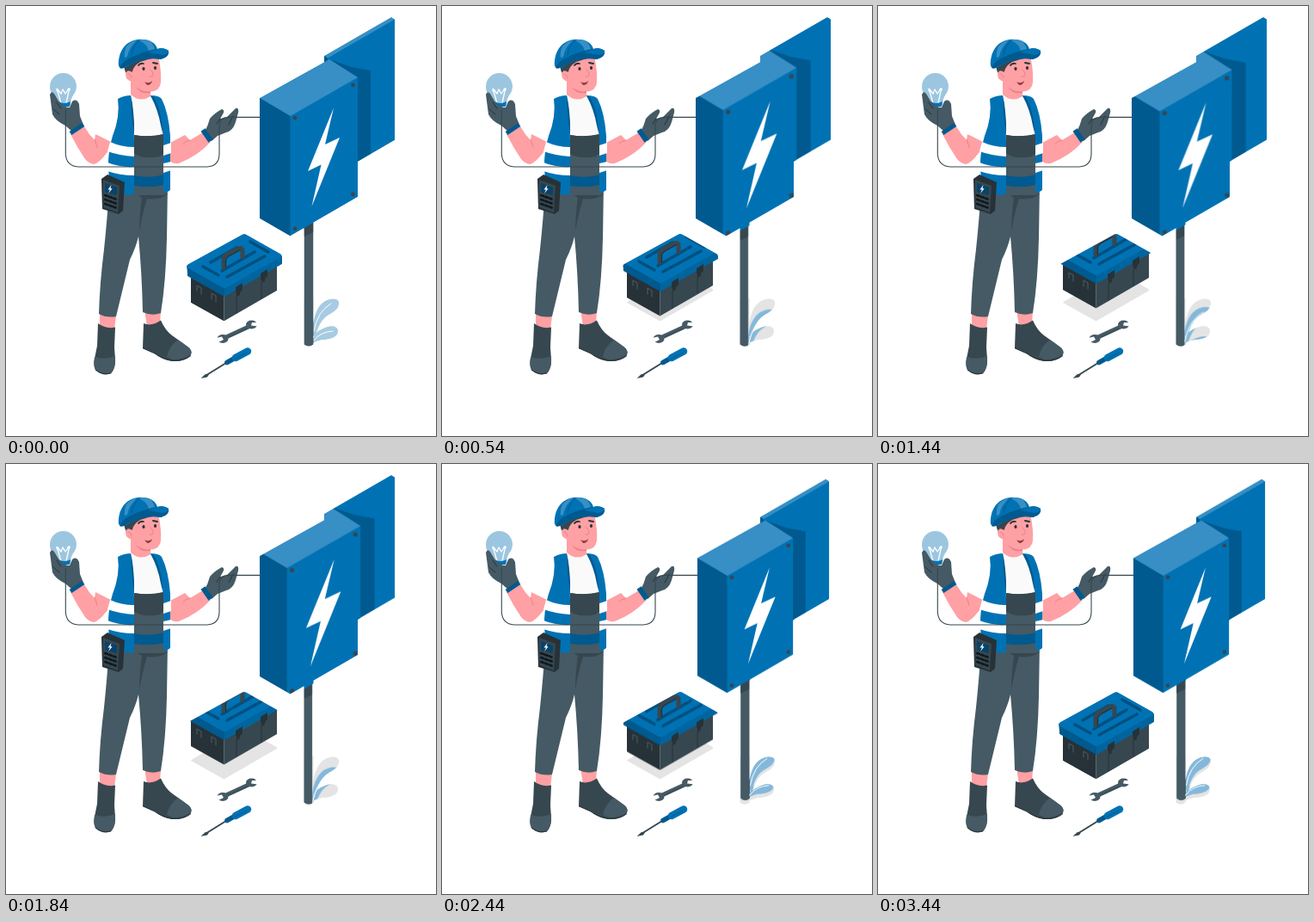
Write an HTML page that moves like this. It is 500 px wide and 500 px high and loops after 3540 ms.

```html
<!DOCTYPE html>
<html lang="en">
<head>
<meta charset="utf-8">
<title>Electrician</title>
<style>
  html, body { margin: 0; width: 100%; height: 100%; overflow: hidden; background: #fff; }
  svg { display: block; width: 100vw; height: 100vh; }

  .blue { fill: #0072b4; }
  .navy { fill: #005a8f; }
  .sky { fill: #378fc5; }
  .slate { fill: #455a64; }
  .dark { fill: #37474f; }
  .ink { fill: #263238; }
  .skin { fill: #ffa0a4; }
  .white { fill: #fff; }
  .shirt { fill: #fafafa; }
  .shade { fill: #e4e4e4; }
  .line { fill: none; stroke-linecap: round; stroke-linejoin: round; }

  .sign, .lift, .leaf { animation: 3540ms infinite; }
  .sign { transform-origin: 373.5px 205px; animation-name: beat; }
  .lift { animation-name: float; }
  .leaf { animation-name: tint; animation-timing-function: step-end; }

  /* Motion advances every 100 ms, after a first hold of 40 ms. */
  @keyframes beat {
    0% { transform: scale(1); animation-timing-function: step-end; }
    1.13% { transform: scale(1); animation-timing-function: steps(5, start); }
    15.254% { transform: scale(1.12); animation-timing-function: steps(5, start); }
    29.379%, 32.203% { transform: scale(.975); animation-timing-function: steps(6, start); }
    49.153% { transform: scale(1.12); animation-timing-function: steps(2, start); }
    54.802% { transform: scale(1.09); animation-timing-function: steps(5, start); }
    68.927%, 100% { transform: scale(.975); }
  }
  @keyframes float {
    0% { transform: translateY(0); animation-timing-function: step-end; }
    1.13% { transform: translateY(0); animation-timing-function: steps(18, start); }
    51.977% { transform: translateY(-18px); animation-timing-function: steps(17, start); }
    100% { transform: translateY(0); }
  }
  @keyframes tint {
    0% { fill: #a6cbe2; }
    1.13%, 100% { fill: #84b8da; }
  }
</style>
</head>
<body>
<svg viewBox="0 0 500 500">
  <defs>
    <path id="plate" d="M370 58L448 13L452 15.500V156L409 181L370 160Z"/>
    <path id="cabinet" d="M295 107L376 62L409 83V222L330.500 267.500L295 247Z"/>
    <path id="pole" d="M346.500 250H357.500V393.500Q352 398 346.500 393.500Z"/>
    <path id="leafA" d="M357 384C356 366 360 353 367 346C373 340 385 338 387 344C388 353 380 356 374 360C366 365 363 374 360 383Z"/>
    <path id="leafB" d="M357 392C357 381 363 377 371 374C378 371 386 372 386 378C386 385 378 387 371 388C365 388 360 390 357 392Z"/>
    <path id="bolt" d="M381 118.500L351 192L366.500 184.500L355.500 233L388 153L371 161Z"/>
    <clipPath id="signClip">
      <use href="#plate"/><use href="#cabinet"/><use href="#pole"/><use href="#leafA"/><use href="#leafB"/>
    </clipPath>
    <clipPath id="boxClip">
      <path d="M210 303Q209.500 301.500 212 300L274 266Q277 264 280 266L319 288Q321 289 321 291V300L315 304V331L253.500 366.500L215 345V317L211 314Z"/>
    </clipPath>
  </defs>

  <rect class="white" width="500" height="500"/>

  <!-- legs and boots -->
  <g>
    <path class="skin" d="M109 358L128 360L126 376L109 374ZM161 353L180 355L179 370L164 373Z"/>
    <path class="dark" d="M107 369Q116 376 127 373.500L126 397L127 411Q127 423 122 427Q113 431 105 424Q101 420 103 410L106 395Z"/>
    <path class="slate" d="M103 408Q115 412 127 407Q128 422 122 426Q113 430 105 423Q101 419 103 408Z"/>
    <path class="dark" d="M160 369Q169 373 180 365.500Q185 377 193 383L211 396Q217 400 215 406Q208 414 193 413Q181 411 173 404L159 398Z"/>
    <path class="slate" d="M187 408Q189 396 200 388L211 396Q217 400 215 405Q207 411 194 411Z"/>
    <path class="line" stroke="#263238" d="M159.500 398L173 404Q182 411 194 412.500Q207 413 214.500 407M104 423Q112 430 122 427"/>
    <path class="slate" d="M120 211L188 207L187 270Q186 320 180 357Q170 361 159 356Q158 310 154 268Q151 281 144 295L128 361Q117 363 108 358Q109 322 114 283Q118 245 120 211Z"/>
    <path class="dark" d="M188 218Q181 226 164 224Q159 240 155 262Q155 245 158 223L152 219H188Z"/>
  </g>

  <!-- arms -->
  <g>
    <path class="skin" d="M75 149L91 140Q96 149 103 156L104 149L122 158L118 170Q108 183 102 184Q96 183 92 178Q83 165 75 149Z"/>
    <path class="line" stroke="#e98388" d="M103 155L106 164"/>
    <path class="skin" d="M191 159L208 150L214 156L229 147L238 158Q223 174 203 182Q198 185 191 181Z"/>
    <path class="line" stroke="#e98388" d="M214 156Q209 157 206 160"/>
  </g>

  <!-- torso -->
  <g>
    <path class="shirt" d="M143 103Q156 114 168 103L184 112L187 156H146Z"/>
    <path class="slate" d="M149 150Q166 153 184 149V220H149Z"/>
    <path class="dark" d="M149 150Q166 153 183 149V172Q180 173 179 175Q164 178 153 174L149 171Z"/>
    <path class="navy" d="M149 197Q166 201 184 196V208Q167 212 149 209Z"/>
    <path class="blue" d="M130 108Q137 104 145 104Q149 125 149 158V219Q133 221 120 214L119 180Q120 164 124 151Q133 128 130 108Z"/>
    <path class="blue" d="M168 104Q178 104 181 108Q189 124 191 151V214Q188 217 183 216V151Q180 123 168 104Z"/>
    <path class="white" d="M121 158Q134 164 149 164V175Q132 174 118 169ZM118 182Q133 188 149 187V197Q132 197 118 192ZM183 162L192 159V171L183 174ZM183 183L192 181V191L183 194Z"/>
    <path class="navy" d="M145 104Q148 116 149 137V151L146 126ZM168 104Q177 121 180 139L183 151Q181 122 172 106Z"/>
  </g>

  <!-- head -->
  <g>
    <path class="skin" d="M141 72L150 58H177Q181 76 180 89Q179 99 168 99.500L168 105Q156 113 145 103V86Z"/>
    <path fill="#e98388" d="M151 94Q159 101 168 99V101Q156 103 151 94Z"/>
    <path class="dark" d="M137 66Q137 78 143 81L147 76Q148 70 156 65L172 60L150 57Z"/>
    <path class="skin" d="M148 78Q141 72 139 79Q139 87 147 88Z"/>
    <path class="line" stroke="#e98388" d="M142 79Q146 80 146 84M168 74Q173 79 170 82H167"/>
    <ellipse class="ink" cx="160" cy="73" rx="1.600" ry="2.100"/>
    <ellipse class="ink" cx="173.500" cy="72" rx="1.600" ry="2.100"/>
    <path class="line" stroke="#263238" stroke-width="1.800" d="M154 69Q156 66 160 67M171 66L176 67"/>
    <path fill="#8e3c44" d="M161 88Q166 91 170 87Q169 92 164 92Z"/>
    <path class="blue" d="M131 70C130 54 138 41 153 39C167 38 174 43 176 50Q184 48 189 52Q191 59 180 62Q160 58 140 71Q134 74 131 70Z"/>
    <path class="navy" d="M132 72Q134 64 151 57Q167 51 176 50Q184 48 189 52Q190 59 180 62Q161 59 140 70Q135 74 132 72Z"/>
    <path class="blue" d="M165 54L176 50Q184 48 189 52Q189 56 182 57Q173 55 165 54Z"/>
    <path class="sky" d="M140 47Q146 40 152 40Q143 48 141 59L138 60Q137 53 140 47ZM154 39.500Q163 38 169 42Q172 46 173 50L166 52Q164 44 154 39.500Z"/>
    <path class="line" stroke="#005a8f" d="M155 40Q147 47 146 57"/>
  </g>

  <!-- radio on the belt -->
  <g>
    <path class="ink" d="M111 201L118 196L138 205L136 238L131 242L112 236Z"/>
    <path class="dark" d="M113 202L132 209L130 240L113 234Z"/>
    <path fill="#06436c" d="M115 206L129 211L128.500 220L115 216Z"/>
    <path class="white" d="M122.500 208L118.500 213.500L121 213.500L119 218L123.500 212.500L121.500 212Z"/>
    <path class="line" stroke="#0f191d" stroke-width="2.500" stroke-dasharray="3 2.200" stroke-linecap="butt" d="M115 220L129 225M115 225L129 230M115 230L129 235"/>
  </g>

  <!-- bulb, gloves and wire -->
  <g>
    <path fill="#9cc6e0" d="M51 94A15.500 15.500 0 1 1 80 101Q75 107 75 115H61Q60 108 55 104Q51 100 51 94Z"/>
    <path class="line" stroke="#fff" stroke-width="1.300" d="M64 113L60 99Q58 95 60 97L64 102L66 97L69 102L73 96Q75 95 73 99L70 113"/>
    <circle class="white" cx="60" cy="98" r="1.600"/><circle class="white" cx="73" cy="97" r="1.600"/>
    <path class="blue" d="M61 111Q68 115 75 111L74 117H63Z"/>
    <path class="slate" d="M51 103Q53 98 56 102L62 112Q68 118 74 118L77 111Q82 107 85 114L86 128L90 138L77 146L69 139Q58 134 54 126Z"/>
    <path class="line" stroke="#263238" d="M59 112L64 119M55 120L62 126"/>
    <path fill="none" stroke="#005a8f" stroke-width="5" d="M75 148L90 138"/>
    <path class="slate" d="M231 146Q235 139 237 131Q243 124 251 120Q255 121 252 126L249 131L256 130L267 119Q271 118 270 124L267 135Q264 145 256 147L246 151L239 157Z"/>
    <path class="line" stroke="#263238" d="M249 131L245 137M264 128L259 138"/>
    <path fill="none" stroke="#005a8f" stroke-width="6" d="M229 144L238 157"/>
    <path class="line" stroke="#37474f" stroke-width="1.100" d="M69.300 121V172Q70 186 84 187H234Q248 186 248 172V140Q248 129.400 259 129.400H299"/>
  </g>

  <!-- power cabinet -->
  <g clip-path="url(#signClip)">
    <rect class="shade" x="346" y="340" width="42" height="60"/>
    <g class="sign">
      <use href="#leafA" class="leaf"/>
      <use href="#leafB" class="leaf"/>
      <path class="line" stroke="#fff" d="M358 378Q362 355 378 346M358 389Q365 379 380 378"/>
      <use href="#pole" class="slate"/>
      <path class="dark" d="M346.500 250H357.500V263L346.500 268Z"/>
      <use href="#plate" class="blue"/>
      <path class="sky" d="M370 58L448 13L452 15.500L374 60.500Z"/>
      <path class="navy" d="M370 58L374 60.500V67H370ZM376 62L402 71L424 75V172L409 181Z"/>
      <use href="#cabinet" class="blue"/>
      <path class="sky" d="M295 107L376 62L409 83L330.500 128Z"/>
      <path class="navy" d="M295 107L330.500 128V267.500L295 247Z"/>
      <use href="#bolt" class="white"/>
      <g class="dark">
        <circle cx="336" cy="130" r="2.400"/><circle cx="403.500" cy="92" r="2.400"/>
        <circle cx="403.500" cy="219" r="2.400"/><circle cx="336" cy="259" r="2.400"/>
      </g>
    </g>
  </g>

  <!-- toolbox -->
  <g clip-path="url(#boxClip)">
    <path class="shade" d="M214 345L277 308L318 331L253.500 368Z"/>
    <g class="lift">
      <path class="ink" d="M215 310L253.500 332V366.500L215 345Z"/>
      <path class="dark" d="M253.500 332L315 296V331L253.500 366.500Z"/>
      <path class="navy" d="M210 302L254 327V338L211 314Z"/>
      <path fill="#00659f" d="M254 327L321 290V300L254 338Z"/>
      <path class="blue" d="M210 303Q209.500 301.500 212 300L274 266Q277 264 280 266L319 288Q322 290 319 292L257 327Q254 329 251 327L212 305Z"/>
      <path class="line" stroke="#00507f" stroke-width="3.600" d="M229 303L247 313M238 298L268 281M257 315L301 291M284 274L305 286M251 308L289 286"/>
      <path class="line" stroke="#37474f" stroke-width="5" d="M253 304V295Q253 291 257 289L270 282Q275 280 275 285V292"/>
      <path class="line" stroke="#263238" stroke-width="1.400" d="M255.500 304V296Q256 293 259 291L272 284"/>
      <path class="ink" d="M267 327L275 322V330L272 333V336L268 338V334L267 333ZM296 311L304 306V314L301 317V320L297 322V318L296 317Z"/>
      <path class="line" stroke="#263238" d="M268 338V357M297 322V340"/>
      <path class="line" stroke="#4c5d66" d="M222 331V325L227 328V335M239 341V334L244 337V344"/>
    </g>
  </g>

  <!-- wrench -->
  <g>
    <path class="line" stroke="#455a64" stroke-width="5" d="M256 385L282 373"/>
    <path class="line" stroke="#37474f" stroke-width="1" d="M259 385L280 375"/>
    <ellipse class="slate" cx="252" cy="387" rx="6.500" ry="5"/>
    <ellipse class="slate" cx="285.500" cy="370.500" rx="6.500" ry="5"/>
    <path class="white" d="M244 386L251 384.500L253 388L247 391ZM293 368L286 368L285 371.500L293 372.500Z"/>
  </g>

  <!-- screwdriver -->
  <g>
    <path class="line" stroke="#37474f" stroke-width="2" d="M231 430.500L256 415"/>
    <path class="dark" d="M226.500 433L232 428L236 428.500L234 431.500Z"/>
    <path class="line" stroke="#005a8f" stroke-width="5.500" d="M257 414.500L265 410"/>
    <path class="line" stroke="#0072b4" stroke-width="8.500" d="M267 409L281 401.500"/>
    <path class="line" stroke="#005a8f" stroke-width="1" d="M266 410.500L280 403"/>
  </g>
</svg>
</body>
</html>
```
